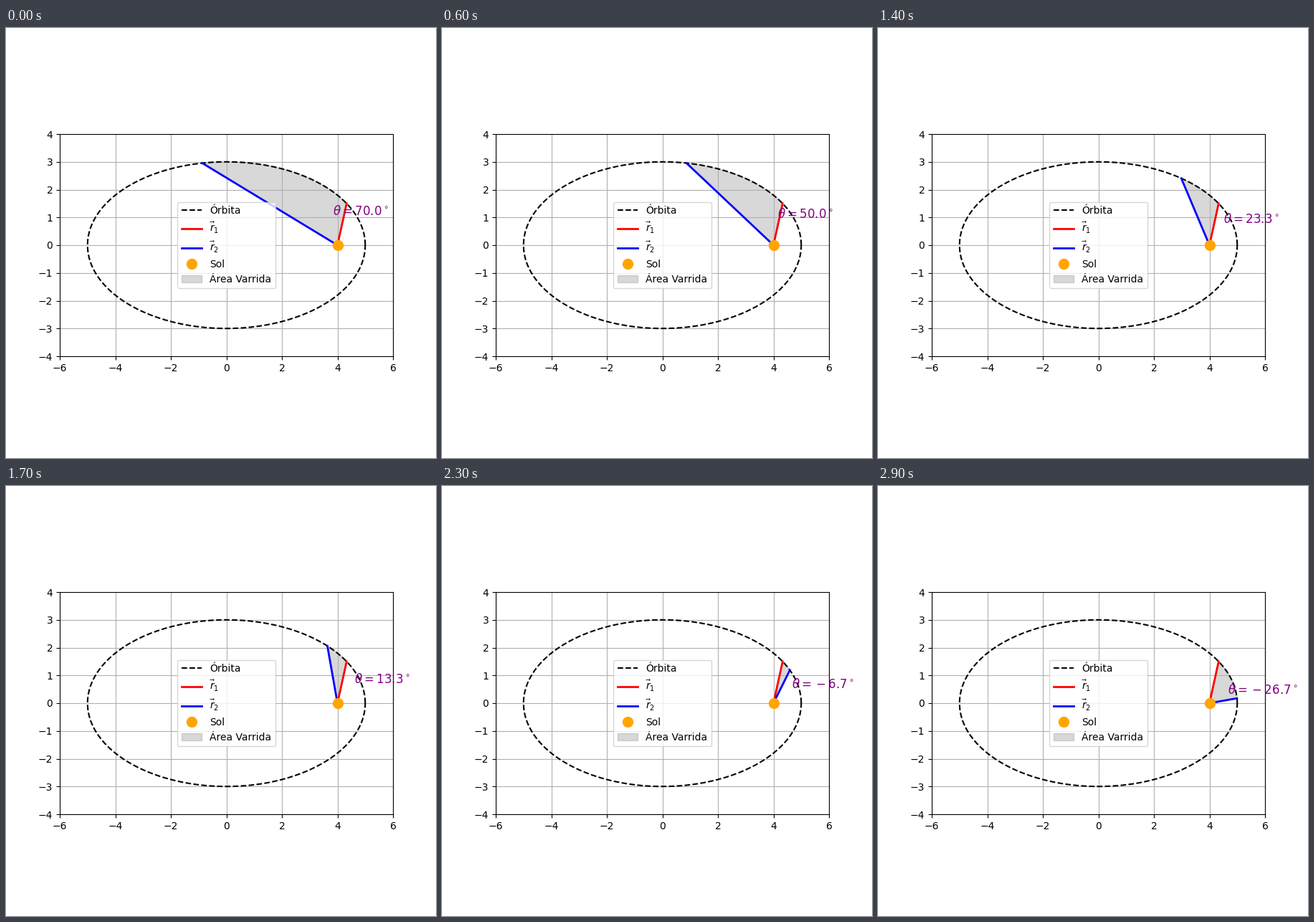
Write a matplotlib script that moves like this. It is 600 px wide and 600 px high and loops after 3000 ms.

```python
import numpy as np
import matplotlib.pyplot as plt
from matplotlib.animation import FuncAnimation

A, B = 5, 3                     # semi-axes of the orbit
SUN = (np.sqrt(A**2 - B**2), 0)
FRAMES, INTERVAL = 30, 100
START, END, FIXED = 100, 0, 30  # eccentric angles in degrees
LABEL_SCALE = 0.4


def ellipse(deg):
    t = np.radians(deg)
    return A * np.cos(t), B * np.sin(t)


def set_ray(line, deg):
    x, y = ellipse(deg)
    line.set_data([SUN[0], x], [SUN[1], y])


def swept_area(deg):
    x, y = ellipse(np.linspace(FIXED, deg, 100))
    return np.column_stack([np.append(SUN[0], x), np.append(SUN[1], y)])


fig, ax = plt.subplots(figsize=(6, 6), dpi=100)
ax.set_xlim(-6, 6)
ax.set_ylim(-4, 4)
ax.set_aspect("equal")
ax.grid(True)

ax.plot(*ellipse(np.linspace(0, 360, 500)), "k--", lw=1.5, label="Órbita")
ray1, = ax.plot([], [], color="red", lw=2, label=r"$\vec{r}_1$")
ray2, = ax.plot([], [], color="blue", lw=2, label=r"$\vec{r}_2$")
ax.plot(*SUN, "o", color="orange", markersize=10, label="Sol")
area, = ax.fill(*swept_area(START).T, color="gray", alpha=0.3,
                label="Área Varrida")
label = ax.text(0, 0, "", fontsize=12, color="purple", ha="center")
ax.legend(loc="center")
set_ray(ray1, FIXED)


def update(i):
    deg = START + (END - START) * i / FRAMES
    set_ray(ray2, deg)
    area.set_xy(swept_area(deg))
    x, y = ellipse((FIXED + deg) / 2)
    label.set_position((SUN[0] + LABEL_SCALE * x, SUN[1] + LABEL_SCALE * y))
    label.set_text(rf"$\theta = {deg - FIXED:.1f}^\circ$")
    return ray2, area, label


anim = FuncAnimation(fig, update, frames=FRAMES, interval=INTERVAL,
                     repeat=True, repeat_delay=0)
plt.show()
```
